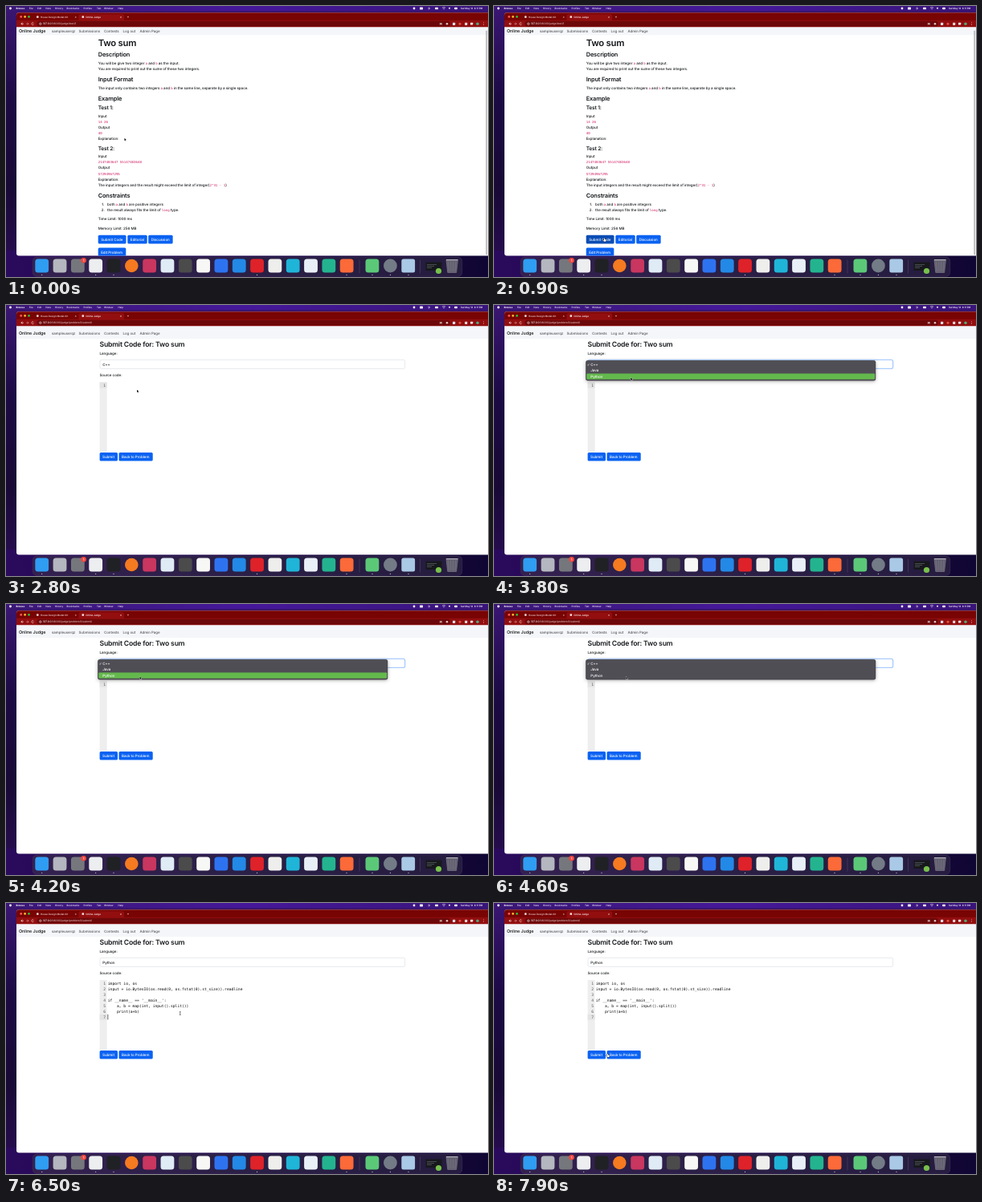
These frames come from a looping animation (600 px wide and 338 px high, 8 s). An HTML page with a canvas:

```html
<!DOCTYPE html>
<html lang="en">
<head>
<meta charset="utf-8">
<title>Online Judge</title>
<style>
html, body { margin: 0; width: 100%; height: 100%; overflow: hidden; background: #1d0b40; }
canvas { display: block; width: 600px; height: 338px; }
</style>
</head>
<body>
<canvas id="stage"></canvas>
<script>
const W = 600, H = 338, LOOP = 8000, STEP = 100;
const canvas = document.getElementById('stage');
const dpr = Math.max(1, window.devicePixelRatio || 1);
canvas.width = W * dpr;
canvas.height = H * dpr;
const ctx = canvas.getContext('2d');
ctx.scale(dpr, dpr);
ctx.textRendering = 'geometricPrecision';

const SANS = 'Inter, Roboto, sans-serif';
const MONO = '"DejaVu Sans Mono", "Noto Sans Mono", monospace';
const INK = '#15181b', PINK = '#cf1a60', BLUE = '#0a62f2', BLUE_HOVER = '#0a4db5';

// ---- helpers ----
function rect(x, y, w, h, color, r = 0) {
  ctx.fillStyle = color;
  ctx.beginPath();
  ctx.roundRect(x, y, w, h, r);
  ctx.fill();
}

function outline(x, y, w, h, color, r, lw) {
  ctx.strokeStyle = color;
  ctx.lineWidth = lw;
  ctx.beginPath();
  ctx.roundRect(x, y, w, h, r);
  ctx.stroke();
}

function disc(x, y, r, color) {
  ctx.fillStyle = color;
  ctx.beginPath();
  ctx.arc(x, y, r, 0, Math.PI * 2);
  ctx.fill();
}

function line(points, color, lw) {
  ctx.strokeStyle = color;
  ctx.lineWidth = lw;
  ctx.beginPath();
  points.forEach(([x, y]) => ctx.lineTo(x, y));
  ctx.stroke();
}

function shape(points, fill, stroke, lw) {
  ctx.beginPath();
  points.forEach(([x, y]) => ctx.lineTo(x, y));
  ctx.closePath();
  ctx.lineWidth = lw;
  ctx.lineJoin = 'round';
  ctx.strokeStyle = stroke;
  ctx.stroke();
  ctx.fillStyle = fill;
  ctx.fill();
}

function gradient(x0, y0, x1, y1, ...colors) {
  const g = ctx.createLinearGradient(x0, y0, x1, y1);
  colors.forEach((c, i) => g.addColorStop(i / (colors.length - 1), c));
  return g;
}

function text(s, x, y, size = 4.5, color = INK, weight = 500, tight = 0.01) {
  ctx.font = `${weight} ${size}px ${SANS}`;
  ctx.letterSpacing = `${-tight * size}px`;
  ctx.fillStyle = color;
  ctx.fillText(s, x, y);
  return ctx.measureText(s).width;
}

function mono(s, x, y, size = 4.1, color = PINK) {
  ctx.font = `${size}px ${MONO}`;
  ctx.letterSpacing = '0px';
  ctx.fillStyle = color;
  ctx.fillText(s, x, y);
  return ctx.measureText(s).width;
}

// Body text; parts between backticks are inline code.
function rich(s, x, y) {
  s.split('`').forEach((part, i) => {
    if (part) x += i % 2 ? mono(part, x, y) : text(part, x, y);
  });
}

const heading = (s, x, y, size) => text(s, x, y, size, INK, 600, 0.02);

function button(label, x, y, w, hover) {
  rect(x, y, w, 10.6, hover ? BLUE_HOVER : BLUE, 1.5);
  text(label, x + 3.5, y + 6.9, 4.5, '#fff');
}

// ---- desktop and browser ----
function desktop() {
  rect(0, 0, W, H, gradient(0, 0, 0, H, '#3b1673', '#1c0a44', '#180936', '#2b0d55'));
  rect(0, 305, W, 33, gradient(0, 0, W, 0, '#2a0a5c', '#1f0848', '#100633'));
  rect(0, 0, W, 6, gradient(0, 0, W, 0, '#3a1775', '#45189a', '#39147a'));
  disc(5.5, 3, 1.4, '#fff');
  text('Browse', 12.5, 4.1, 3, '#fff', 700);
  [['File', 33.5], ['Edit', 39], ['View', 49], ['History', 61], ['Bookmarks', 75.5],
   ['Profiles', 96.5], ['Tab', 113], ['Window', 122], ['Help', 139.5]]
    .forEach(([s, x], i) => text(s, i ? x : 28.8, 4.1, 3, '#f3effa'));
  disc(508, 3, 1.4, '#eee');
  rect(515, 1.6, 4, 2.8, '#eee', 0.6);
  line([[526, 4.2], [526, 1.8], [528, 3], [526, 4.2]], '#eee', 0.5);
  rect(534, 1.8, 4, 2.4, '#eee', 0.6);
  line([[543, 2.2], [545, 1.6], [547, 2.2]], '#eee', 0.7);
  disc(545, 3.6, 0.7, '#eee');
  disc(552, 2.8, 1, '#eee');
  rect(558, 1.8, 4, 2.4, '#eee', 1);
  text('Sat May 13  6:11 PM', 566, 4.1, 3, '#fff');
}

function browser(url) {
  rect(13, 8.3, 590, 303.2, '#fff', 3);
  rect(13, 8.3, 590, 12, '#780404', 3);
  ['#ff5f57', '#febc2e', '#28c840'].forEach((c, i) => disc(18.7 + i * 4.9, 13.4, 1.35, c));
  disc(39.3, 13.7, 1.4, '#e8d6d6');
  text('House Design Model-Kit', 43, 14.8, 3, '#f0d9d9');
  text('×', 85.5, 14.8, 3.6, '#f0d9d9');
  rect(90.5, 10.2, 56.5, 9, '#920e0f', 2);
  disc(95.8, 13.7, 1.4, '#f2dede');
  text('Online Judge', 99.3, 14.8, 3, '#fff');
  text('×', 141.7, 14.8, 3.6, '#fff');
  text('+', 150.5, 15.1, 4.4, '#f5dede');

  rect(13, 17.8, 590, 8.7, '#920e0f');
  rect(38.5, 18.8, 514.5, 6.8, '#6d080a', 3.4);
  line([[20.5, 20.8], [18.8, 22.2], [20.5, 23.6]], '#fff', 0.6);
  line([[18.8, 22.2], [22, 22.2]], '#fff', 0.6);
  line([[26.5, 20.8], [28.2, 22.2], [26.5, 23.6]], '#d69898', 0.6);
  line([[25, 22.2], [28.2, 22.2]], '#d69898', 0.6);
  ctx.strokeStyle = '#fff';
  ctx.lineWidth = 0.6;
  ctx.beginPath();
  ctx.arc(33.3, 22.2, 1.4, 0.5, 5.6);
  ctx.stroke();
  ctx.beginPath();
  ctx.arc(42.8, 22.2, 1.2, 0, 6.3);
  ctx.stroke();
  const w = text('127.0.0.1', 46, 23.4, 3.3, '#fff');
  text(url, 46 + w, 23.4, 3.3, '#dfb5b5');
  line([[540, 23.4], [541.3, 20.9], [542.6, 23.4], [539.7, 21.8], [542.9, 21.8], [540, 23.4]], '#eee', 0.4);
  disc(549, 22.2, 1.3, '#e5c5c5');
  rect(556, 20.7, 3.2, 3.2, '#d9dfe8', 0.5);
  disc(565, 22.2, 1.5, '#e25645');
  rect(571.2, 20.7, 3, 3.2, '#f0dada', 0.5);
  rect(578, 20.8, 3.2, 2.8, '#eee', 0.4);
  disc(587, 22.2, 1.8, '#53a77a');
  [20.7, 22.2, 23.7].forEach(y => disc(594.5, y, 0.4, '#fff'));
}

function navbar(bottom, base) {
  rect(13, 26.5, 587, bottom - 26.5, '#f4f6f9');
  text('Online Judge', 16, base + 0.2, 5.4, '#111');
  [['sampleuserqz', 57], ['Submissions', 90.5], ['Contests', 122], ['Log out', 145.5], ['Admin Page', 166.5]]
    .forEach(([s, x]) => text(s, x, base, 4.45, '#55575a'));
}

function dock() {
  rect(33, 313, 535, 24.5, gradient(33, 0, 568, 0, '#33204f', '#2a1f45', '#251c3f'), 5);
  outline(33.2, 313.2, 534.6, 24.1, '#463960', 5, 0.4);
  const colors = ['#2f9df2', '#b4b7bf', '#75777d', '#eceef0', '#202124', '#f57a20', '#c9365f',
    '#dfebf5', '#4b4b4b', '#f7f7f5', '#2d73f0', '#2389e6', '#df2229', '#eeeeec', '#1fb5d8',
    '#e9eff7', '#23b48f', '#fb6a38'];
  colors.forEach((c, i) => {
    const x = 44.7 + i * 22.32;
    if (i === 5) disc(x, 324, 8.3, c);
    else rect(x - 8.4, 315.6, 16.8, 16.8, c, 3.5);
  });
  line([[440, 316.5], [440, 333.5]], '#5a4d70', 0.5);
  rect(447.5, 315.6, 16.8, 16.8, '#5bc878', 3.5);
  disc(478.4, 324, 8.4, '#737b86');
  rect(492.3, 315.6, 16.8, 16.8, '#a9c9e6', 2.5);
  line([[515.5, 316.5], [515.5, 333.5]], '#5a4d70', 0.5);

  // minimised window with its badge
  rect(522.5, 319.5, 20, 10.5, '#17191c', 0.8);
  [322, 324, 326].forEach((y, i) => rect(524, y, 12 - i * 3, 0.5, '#7a8088'));
  disc(538.5, 330.5, 3.6, '#78c04c');

  // bin
  ctx.globalAlpha = 0.75;
  shape([[548, 316.5], [562.4, 316.5], [560.6, 332.4], [549.8, 332.4]], '#777580', '#a4a2ab', 0.7);
  ctx.globalAlpha = 1;
  line([[548, 316.7], [562.4, 316.7]], '#c4c2c9', 1);
  for (let i = 0; i < 4; i++) line([[550.5 + i * 3.1, 318.5], [551.4 + i * 2.5, 331]], '#92909a', 0.35);

  disc(96.6, 317.3, 3.3, '#f0453f');
  text('1', 95.7, 318.9, 4.2, '#fff');
  [44.7, 111.7, 134, 312.5, 424, 456, 478.4, 501].forEach(x => disc(x, 335.3, 0.6, '#ddd8e4'));
}

// ---- pages ----
const BODY = [
  ['You will be give two integer `a` and `b` as the input.', 72.8],
  ['You are required to print out the sume of these two integers.', 79.9],
  ['The input only contains two integers `a` and `b` in the same line, separate by a single space.', 103.7],
  ['Input', 138.5], ['`14 26`', 145.6], ['Output', 152.7], ['`40`', 159.7], ['Explanation:', 166.7],
  ['Input', 189.1], ['`2147483647 55147483648`', 196.3], ['Output', 203.4], ['`57294967295`', 210.5],
  ['Explanation:', 217.5],
  ['The input integers and the result might exceed the limit of integer(`2^31 - 1`)', 224.6],
  ['Time Limit: 1000 ms', 267.1], ['Memory Limit: 256 MB', 278.7]
];

function problemPage(hover) {
  navbar(36.3, 32.6);
  heading('Two sum', 114.7, 50.1, 11.3);
  [['Description', 63.4], ['Input Format', 94.3], ['Example', 118.3], ['Constraints', 239]]
    .forEach(([s, y]) => heading(s, 114.7, y, 7.4));
  [['Test 1:', 129.4], ['Test 2:', 180.1]].forEach(([s, y]) => heading(s, 114.7, y, 6.5));
  BODY.forEach(([s, y]) => rich(s, 114.7, y));
  text('1.', 119.3, 248.6);
  rich('both `a` and `b` are positive integers', 126, 248.6);
  text('2.', 118.8, 255.8);
  rich('the result always fits the limit of `long` type.', 126, 255.8);
  button('Submit Code', 114.7, 285.8, 34.8, hover);
  button('Editorial', 151.3, 285.8, 24.4);
  button('Discussion', 177.2, 285.8, 30.4);
  ctx.save();
  ctx.beginPath();
  ctx.rect(13, 26, 587, 285.5);
  ctx.clip();
  button('Edit Problem', 114.7, 301.6, 34.6);
  ctx.restore();
  rect(597.3, 30.5, 1.8, 280, '#b9b9b9', 0.9);
}

const CODE = [
  'import io, os',
  'input = io.BytesIO(os.read(0, os.fstat(0).st_size)).readline',
  '',
  "if __name__ == '__main__':",
  '    a, b = map(int, input().split())',
  '    print(a+b)',
  ''
];

function editor(t) {
  const lines = t >= PASTED ? CODE : [''];
  const last = lines.length - 1, lh = 7.03;
  rect(116.6, 96, 9, 87.5, '#eeeeee');
  rect(116.6, 96.6 + last * lh, 9, lh, '#e4e4e4');
  lines.forEach((s, i) => {
    const y = 101.9 + i * lh;
    mono(String(i + 1), 121.3, y, 4.65, '#555');
    mono(s, 126.8, y, 4.65, '#000');
  });
  const blinkOn = (t + 200) % 1000 >= 500;
  if (t >= EDIT_FOCUS && blinkOn) rect(126.6, 96.8 + last * lh, 0.6, 6.6, '#000');
}

function dropdown(t) {
  ctx.save();
  ctx.shadowColor = 'rgba(0,0,0,.35)';
  ctx.shadowBlur = 4 * dpr;
  ctx.shadowOffsetY = dpr;
  rect(114.4, 69.3, 360.6, 25, '#504e55', 2);
  ctx.restore();
  outline(114.6, 69.5, 360.2, 24.6, '#3b393f', 2, 0.5);
  const pick = t >= 3500 && !(t >= PICK && t < PICK + 100);
  if (pick) rect(115.3, 85.5, 358.9, 7.3, '#64b94d', 1);
  line([[116.3, 74.6], [117.1, 75.5], [118.4, 73.2]], '#fff', 0.5);
  ['C++', 'Java', 'Python'].forEach((s, i) => text(s, 120.3, 76 + i * 7.25, 4.5, '#fff'));
}

function submitPage(t, hover) {
  navbar(42.3, 36.6);
  heading('Submit Code for: Two sum', 116.5, 51.9, 8.65);
  text('Language:', 116.5, 61.7);
  if (t >= OPEN && t < EDIT_FOCUS) {
    outline(117, 68.4, 379.6, 11, '#c6dcfd', 2, 1.4);
    outline(117, 68.4, 379.6, 11, '#86b7fe', 2, 0.5);
  } else {
    outline(117, 68.4, 379.6, 11, '#ced4da', 1.8, 0.5);
  }
  text(t >= CLOSE ? 'Python' : 'C++', 120.3, 75.6);
  text('Source code:', 116.5, 89.1);
  editor(t);
  button('Submit', 116.6, 184, 22.4, hover === 'submit');
  button('Back to Problem', 140.5, 184, 42.2);
  if (t >= OPEN && t < CLOSE) dropdown(t);
}

// ---- pointer ----
const LOADED = 1700, OPEN = 3300, PICK = 4600, CLOSE = 4800, EDIT_FOCUS = 5500, PASTED = 6000;

const PATH = [
  [0, 147.5, 164.8], [100, 147.5, 164.8], [800, 137.4, 289.5], [2000, 137.4, 289.5],
  [2700, 163, 105.8], [2900, 163, 105.8], [3200, 167, 74], [3400, 167, 74],
  [3700, 170.3, 90.6], [3900, 170.3, 90.6], [4400, 164.5, 90.6], [4800, 164.5, 90.6],
  [5400, 216.8, 137.6], [6700, 216.8, 137.6], [7800, 141.5, 188], [8000, 141.5, 188]
];

function pointerAt(t) {
  let i = 1;
  while (i < PATH.length - 1 && PATH[i][0] <= t) i++;
  const [t0, x0, y0] = PATH[i - 1], [t1, x1, y1] = PATH[i];
  const k = Math.min(1, (t - t0) / (t1 - t0)), e = k * k * (3 - 2 * k);
  return { x: x0 + (x1 - x0) * e, y: y0 + (y1 - y0) * e };
}

const inside = (p, x, y, w, h) => p.x > x && p.x < x + w && p.y > y && p.y < y + h;

function hovered(p, first) {
  if (first) return inside(p, 114.7, 285.8, 34.8, 10.6) ? 'code' : '';
  if (inside(p, 116.6, 184, 22.4, 10.6)) return 'submit';
  return inside(p, 140.5, 184, 42.2, 10.6) ? 'back' : '';
}

function arrow({ x, y }) {
  const pts = [[0, 0], [0, 3.2], [0.8, 2.5], [1.3, 3.7], [1.8, 3.5], [1.3, 2.3], [2.3, 2.3]];
  shape(pts.map(([a, b]) => [x + a, y + b]), '#000', '#fff', 0.6);
}

function hand({ x, y }) {
  const pts = [[-0.5, 0], [0.4, 0], [0.5, 1.4], [2.2, 1.9], [2.1, 3.4], [1.6, 4.2], [-0.4, 4.2],
    [-1.6, 2.6], [-1.2, 2.2], [-0.5, 2.8]];
  shape(pts.map(([a, b]) => [x + a, y + b]), '#fff', '#000', 0.8);
}

function beam({ x, y }) {
  line([[x, y - 1.9], [x, y + 1.9]], '#222', 0.6);
  line([[x - 0.9, y - 2], [x + 0.9, y - 2]], '#222', 0.5);
  line([[x - 0.9, y + 2], [x + 0.9, y + 2]], '#222', 0.5);
}

// ---- frame ----
function draw(t) {
  const p = pointerAt(t), first = t < LOADED, hover = hovered(p, first);
  desktop();
  browser(first ? ':8000/judge/test/1' : ':8000/judge/problem/1/submit/');
  if (first) problemPage(hover === 'code');
  else submitPage(t, hover);
  dock();
  if (hover) hand(p);
  else if (t >= CLOSE && inside(p, 126, 96, 370, 87)) beam(p);
  else arrow(p);
}

function tick() {
  draw(Math.floor(performance.now() % LOOP / STEP) * STEP);
  requestAnimationFrame(tick);
}
tick();
</script>
</body>
</html>
```
